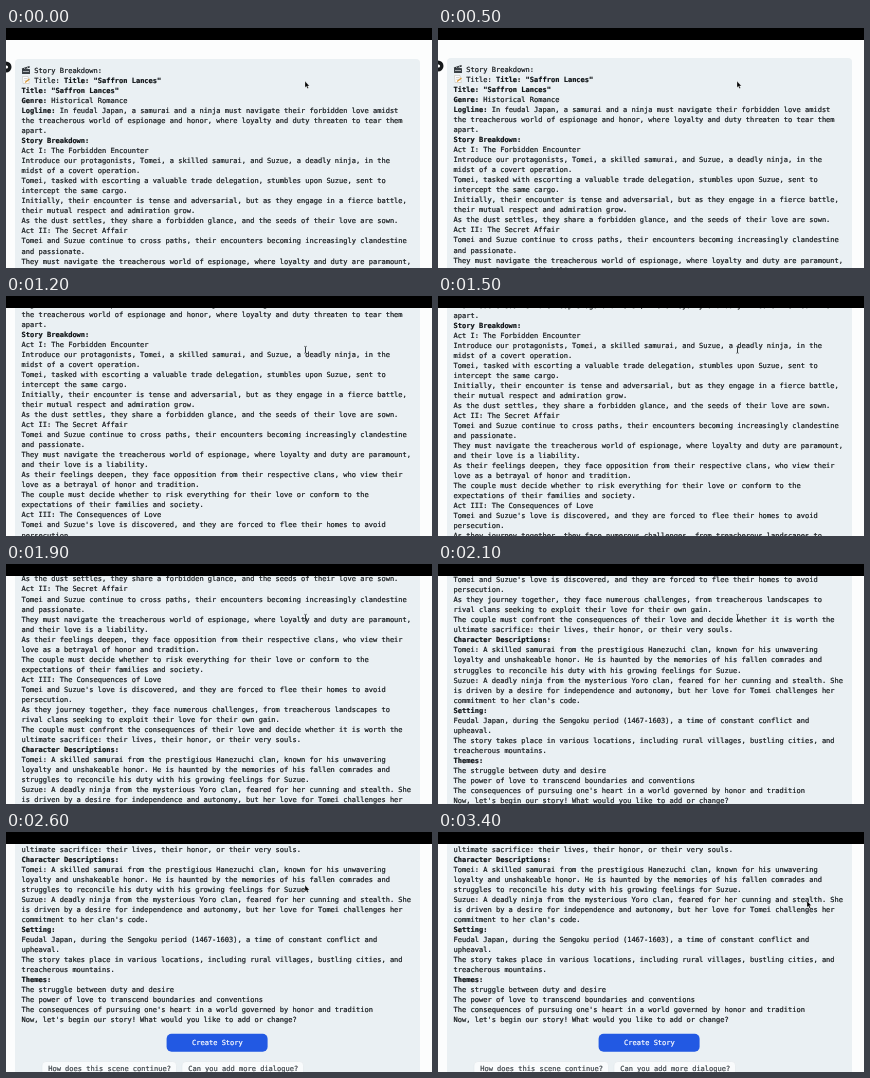
Write an HTML page that moves like this. It is 426 px wide and 240 px high and loops after 3500 ms.

```html
<!DOCTYPE html>
<html lang="en">
<head>
<meta charset="utf-8">
<title>Story breakdown</title>
<style>
  html, body { margin: 0; width: 100%; height: 100%; overflow: hidden; background: #fcfdfd; }
  svg { display: block; width: 426px; height: 240px; }
  text {
    font: 7.045px "DejaVu Sans Mono", monospace;
    fill: #14181b;
    stroke: #14181b;
    stroke-width: .2;
    white-space: pre;
    text-rendering: geometricPrecision;
  }
  .bold { font-weight: bold; fill: #0c1013; }
  .soft { fill: #3c4348; stroke: #3c4348; }
  .label { fill: #fff; stroke: #fff; }
</style>
</head>
<body>
<svg viewBox="0 0 426 240">
  <rect width="426" height="240" fill="#fcfdfd"/>
  <g id="page">
    <circle cx="0" cy="39" r="5.5" fill="#15181a"/>
    <circle cx="0.5" cy="39" r="1.6" fill="#fff"/>
    <rect x="9" y="31" width="405" height="700" rx="4" fill="#eaf0f3"/>

    <!-- clapper board -->
    <rect x="16" y="41" width="8" height="5" rx=".6" fill="#3b4146"/>
    <path d="M15.8 40.6 23.4 38l.5 1.5-7.6 2.4z" fill="#2c3135"/>
    <path d="M18 40l1.2 1M20.8 39l1.2 1M17 43.5h6" stroke="#d5dadd" stroke-width=".7"/>
    <!-- sheet and pencil -->
    <path d="M16.5 48.5h5.5l1.3 7h-6.2z" fill="#fff" stroke="#b9b5ac" stroke-width=".5"/>
    <path d="M18 50.5h3.5M18.2 52.3h3.5" stroke="#a5a8aa" stroke-width=".5"/>
    <path d="M19 54.5l4.5-3.5" stroke="#d89a3c" stroke-width="1.3"/>

    <g id="story"></g>

    <rect x="160.6" y="538.2" width="101" height="18" rx="5" fill="#2259e3"/>
    <text class="label" x="186" y="549.8">Create Story</text>
    <g fill="#f9fbfc" stroke="#dfe5e9" stroke-width=".5">
      <rect x="36" y="566" width="134.5" height="15" rx="4"/>
      <rect x="176" y="566" width="121.5" height="15" rx="4"/>
    </g>
    <text class="soft" x="42.2" y="575">How does this scene continue?</text>
    <text class="soft" x="182.2" y="575">Can you add more dialogue?</text>
  </g>
  <rect width="426" height="12"/>

  <path id="arrow" d="M0 0v6.2l1.4-1.2 1 2.2 1.1-.5-1-2.1h1.9z" stroke="#fff" stroke-width=".3"/>
  <path id="beam" d="M298.3 50.3q1.2 0 1.2 1v5q0 1-1.2 1M300.7 50.3q-1.2 0-1.2 1v5q0 1 1.2 1"
        fill="none" stroke="#14181a" stroke-width=".6"/>
</svg>
<script>
// Stretches between asterisks are bold.
const story = `   Story Breakdown:
   Title: *Title: "Saffron Lances"*
*Title: "Saffron Lances"*
*Genre:* Historical Romance
*Logline:* In feudal Japan, a samurai and a ninja must navigate their forbidden love amidst
the treacherous world of espionage and honor, where loyalty and duty threaten to tear them
apart.
*Story Breakdown:*
Act I: The Forbidden Encounter
Introduce our protagonists, Tomei, a skilled samurai, and Suzue, a deadly ninja, in the
midst of a covert operation.
Tomei, tasked with escorting a valuable trade delegation, stumbles upon Suzue, sent to
intercept the same cargo.
Initially, their encounter is tense and adversarial, but as they engage in a fierce battle,
their mutual respect and admiration grow.
As the dust settles, they share a forbidden glance, and the seeds of their love are sown.
Act II: The Secret Affair
Tomei and Suzue continue to cross paths, their encounters becoming increasingly clandestine
and passionate.
They must navigate the treacherous world of espionage, where loyalty and duty are paramount,
and their love is a liability.
As their feelings deepen, they face opposition from their respective clans, who view their
love as a betrayal of honor and tradition.
The couple must decide whether to risk everything for their love or conform to the
expectations of their families and society.
Act III: The Consequences of Love
Tomei and Suzue's love is discovered, and they are forced to flee their homes to avoid
persecution.
As they journey together, they face numerous challenges, from treacherous landscapes to
rival clans seeking to exploit their love for their own gain.
The couple must confront the consequences of their love and decide whether it is worth the
ultimate sacrifice: their lives, their honor, or their very souls.
*Character Descriptions:*
Tomei: A skilled samurai from the prestigious Hanezuchi clan, known for his unwavering
loyalty and unshakeable honor. He is haunted by the memories of his fallen comrades and
struggles to reconcile his duty with his growing feelings for Suzue.
Suzue: A deadly ninja from the mysterious Yoro clan, feared for her cunning and stealth. She
is driven by a desire for independence and autonomy, but her love for Tomei challenges her
commitment to her clan's code.
*Setting:*
Feudal Japan, during the Sengoku period (1467-1603), a time of constant conflict and
upheaval.
The story takes place in various locations, including rural villages, bustling cities, and
treacherous mountains.
*Themes:*
The struggle between duty and desire
The power of love to transcend boundaries and conventions
The consequences of pursuing one's heart in a world governed by honor and tradition
Now, let's begin our story! What would you like to add or change?`;

const LOOP = 3500, STEP = 100, LINE = 10.04;
const $ = id => document.getElementById(id);
const clamp = v => Math.min(1, Math.max(0, v));
const progress = (t, from, to) => clamp((t - from) / (to - from));
const easeOut = (k, power) => 1 - (1 - k) ** power;

const add = (parent, tag, attrs) => {
  const el = document.createElementNS("http://www.w3.org/2000/svg", tag);
  for (const name in attrs) el.setAttribute(name, attrs[name]);
  return parent.appendChild(el);
};

story.split("\n").forEach((line, row) => {
  const text = add($("story"), "text", { x: 15.6, y: 44.8 + row * LINE });
  line.split("*").forEach((part, i) => {
    if (part) add(text, "tspan", i % 2 ? { class: "bold" } : {}).textContent = part;
  });
});

// A slow start, then two flicks that coast to a stop.
const scrollAt = t =>
  progress(t, 0, 500)
  + 82.5 * easeOut(progress(t, 600, 1500), 2)
  + 253 * easeOut(progress(t, 1800, 2600), 3.5);

function draw(now) {
  const t = Math.floor(now % LOOP / STEP) * STEP;
  const scroll = scrollAt(t);
  const overText = scroll > 70 && scroll < 336;
  const move = progress(t, 3000, 3400);
  $("page").setAttribute("transform", `translate(0 ${-scroll})`);
  $("arrow").setAttribute("transform", `translate(${299 + 70 * move} ${53.3 + 15.7 * move})`);
  $("arrow").style.display = overText ? "none" : "";
  $("beam").style.display = overText ? "" : "none";
}

const start = performance.now();
function tick() {
  draw(performance.now() - start);
  requestAnimationFrame(tick);
}
tick();
</script>
</body>
</html>
```
